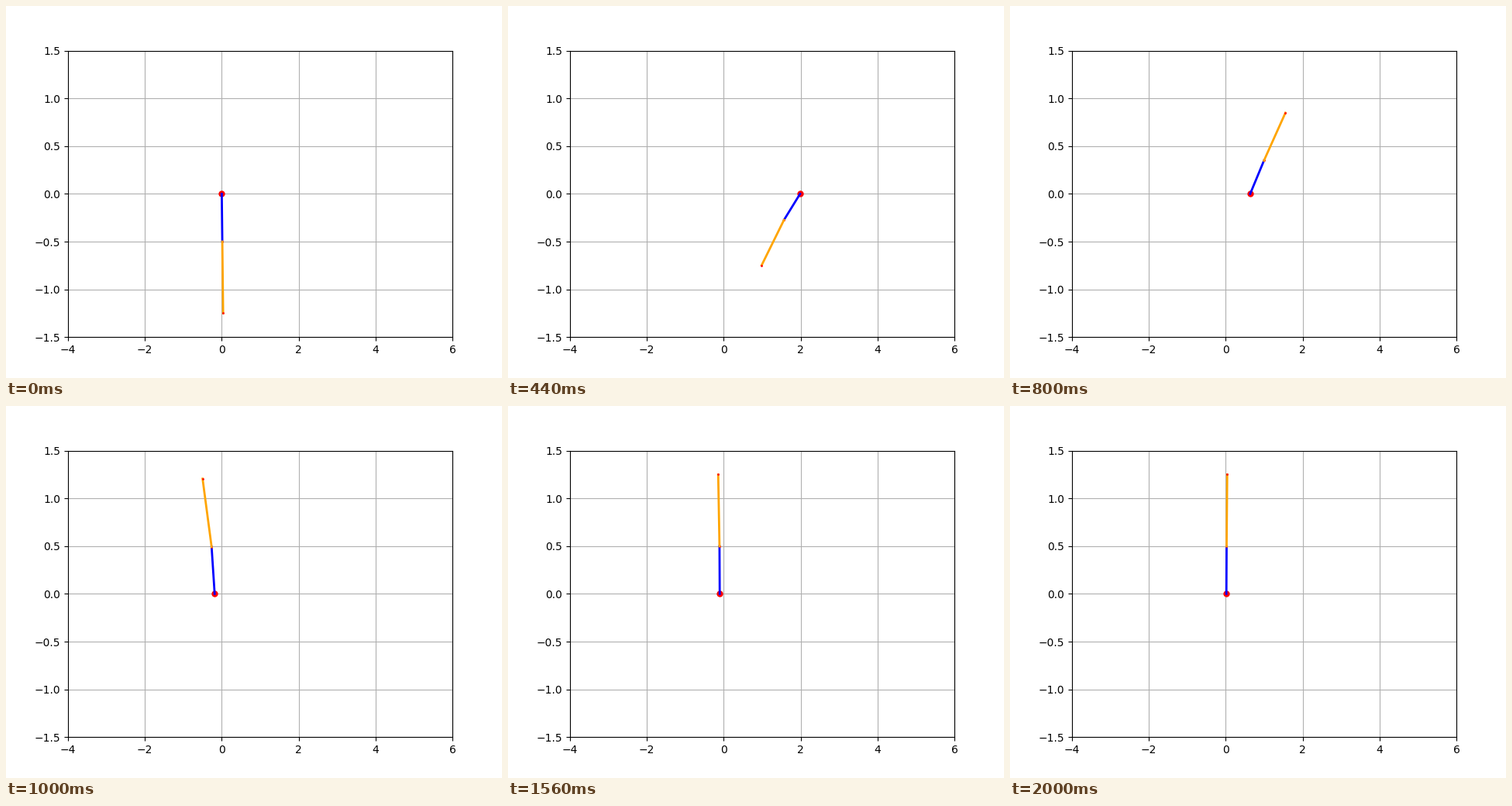
A matplotlib script for the animation above (2020 ms loop, 640 px wide and 480 px high).

```python
import matplotlib.pyplot as plt
import numpy as np
from matplotlib.animation import FuncAnimation

FRAMES, INTERVAL = 101, 20
L1, L2 = 0.5, 0.75  # rod lengths

# Key poses: step, cart position, rod angles clockwise from upright
KEYS = np.array([
    (1, 0.0, -3.17, -3.17),       # hanging
    (8, -0.5, -3.5, -3.5),        # wind up
    (22, 1.985, -2.15, -2.255),   # fling
    (28, 2.6, -0.25, -0.3),       # over the top
    (34, 2.15, 0.98, 0.98),       # widest lean
    (40, 0.635, 0.8, 0.84),       # catch
    (50, -0.185, -0.16, -0.318),  # settle
    (64, -0.01, 0.092, 0.176),
    (78, -0.105, -0.012, -0.045),
    (100, 0.016, 0.012, 0.021),
])
STEPS, POSES = KEYS[:, 0], KEYS[:, 1:]


def key_slopes():
    """Harmonic mean of neighbouring slopes, zero at turning points."""
    s = np.diff(POSES, axis=0) / np.diff(STEPS)[:, None]
    a, b = s[:-1], s[1:]
    same = a * b > 0
    mid = np.where(same, 2 * a * b / np.where(same, a + b, 1), 0)
    return np.pad(mid, ((1, 1), (0, 0)))


SLOPES = key_slopes()


def pose(k):
    """Cubic Hermite interpolation of (cart, angle 1, angle 2)."""
    k = max(k, STEPS[0])
    i = min(np.searchsorted(STEPS, k, side="right"), len(STEPS) - 1) - 1
    h = STEPS[i + 1] - STEPS[i]
    s = (k - STEPS[i]) / h
    ease = s * s * (3 - 2 * s)
    return (POSES[i] + (POSES[i + 1] - POSES[i]) * ease
            + h * s * (1 - s) ** 2 * SLOPES[i]
            - h * s * s * (1 - s) * SLOPES[i + 1])


fig, ax = plt.subplots(figsize=(6.4, 4.8), dpi=100)
ax.set_xlim(-4, 6)
ax.set_ylim(-1.5, 1.5)
ax.set_xticks(range(-4, 7, 2))
ax.grid(color="#b0b0b0", linewidth=0.8)


def dot(size):
    return ax.plot([], [], "o", color="red", markersize=size)[0]


def rod(color):
    return ax.plot([], [], color=color, linewidth=2)[0]


# Creation order is the stacking order
cart, lower, joint, upper, tip = dot(5), rod("blue"), dot(1), rod("orange"), dot(1)


def update(k):
    x, a, b = pose(k)
    p0 = np.array([x, 0.0])
    p1 = p0 + L1 * np.array([np.sin(a), np.cos(a)])
    p2 = p1 + L2 * np.array([np.sin(b), np.cos(b)])
    for marker, p in ((cart, p0), (joint, p1), (tip, p2)):
        marker.set_data([p[0]], [p[1]])
    for line, p, q in ((lower, p0, p1), (upper, p1, p2)):
        line.set_data([p[0], q[0]], [p[1], q[1]])
    return cart, lower, joint, upper, tip


anim = FuncAnimation(fig, update, frames=FRAMES, interval=INTERVAL,
                     repeat=True, repeat_delay=0)
plt.show()
```
